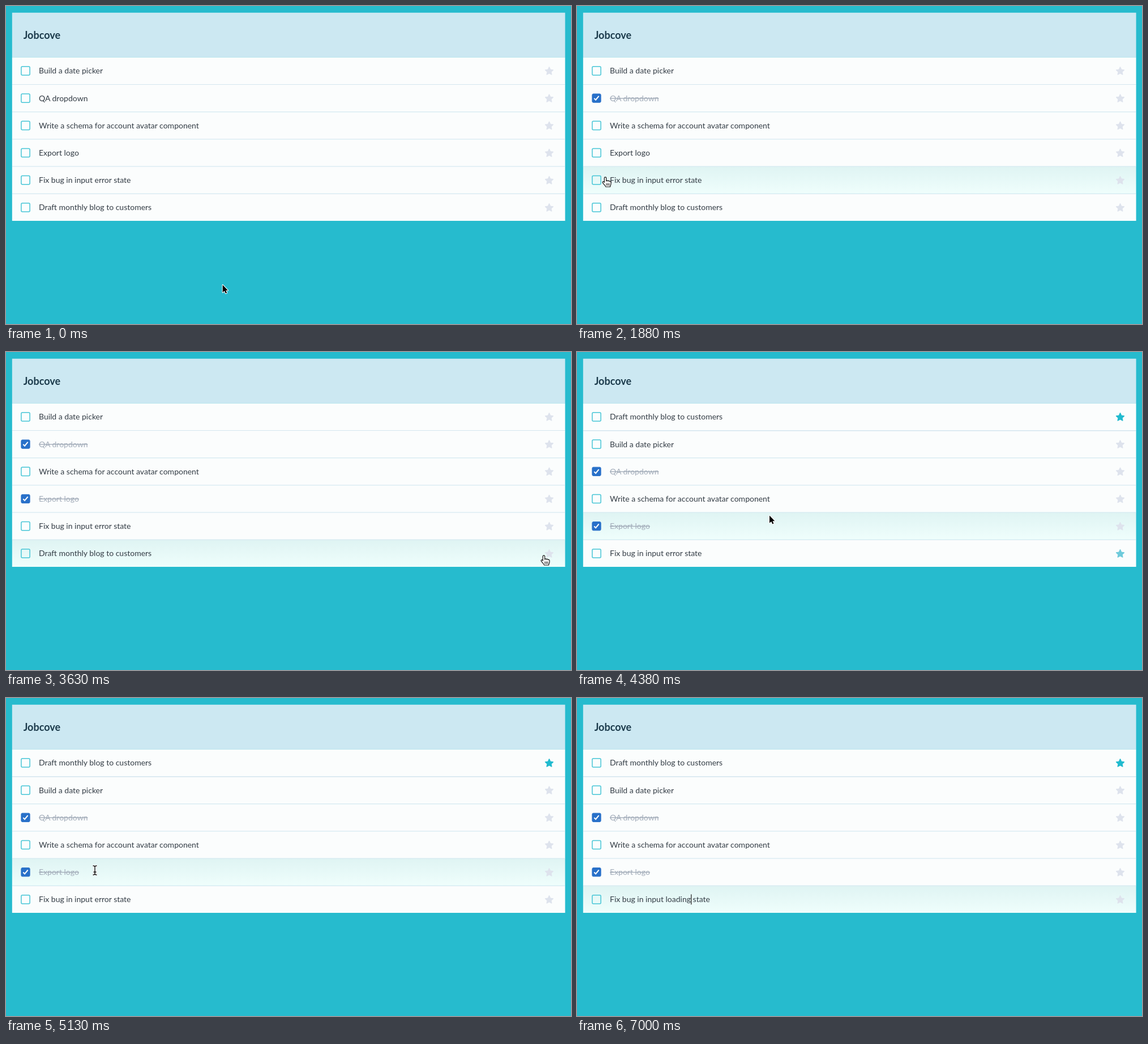
An HTML page for the animation above (7.12 s loop, 998 by 561 pixels).

```html
<!DOCTYPE html>
<html lang="en">
<head>
<meta charset="utf-8">
<title>Task list</title>
<style>
  html, body { margin: 0; width: 100%; height: 100%; overflow: hidden; background: #26bbce; }
  #stage { display: block; width: 100%; height: 100%; }
  text { font: 14px Lato, "Open Sans", sans-serif; fill: #333c45; white-space: pre; }
  .title { font-size: 18px; font-weight: 700; fill: #1b3a4b; }

  .back { fill: #fbfdfd; }
  .hover .back { fill: url(#glow); }
  .line { fill: #d4e6ef; }
  .pressed text, .done text { text-decoration: line-through; }
  .done text { fill: #a3adba; }

  .box { fill: none; stroke: #45c5d6; stroke-width: 1.5; }
  .check { fill: none; stroke: #fff; stroke-width: 2; visibility: hidden; }
  .pressed .box { fill: #2159a9; stroke: #2159a9; stroke-width: 1; }
  .done .box { fill: #2870c9; stroke: #2870c9; stroke-width: 1; }
  .done .check { visibility: visible; }

  .star { fill: #dee3ed; stroke: #dee3ed; stroke-width: 1.5; stroke-linejoin: round; }
  .star.on { fill: #21bbcf; stroke: #21bbcf; }

  #cursor g { display: none; stroke-linejoin: round; stroke-linecap: round; }
  #cursor[data-kind=arrow] .arrow,
  #cursor[data-kind=hand] .hand,
  #cursor[data-kind=beam] .beam { display: block; }
</style>
</head>
<body>
<svg id="stage">
  <defs>
    <linearGradient id="glow" x2="0" y2="1">
      <stop stop-color="#dff4f3"/>
      <stop offset="1" stop-color="#effefc"/>
    </linearGradient>
    <path id="bar" d="M-3-8Q0-8 0-6Q0-8 3-8M0-6V6M-3 8Q0 8 0 6Q0 8 3 8M-2 3H2"/>
  </defs>
  <rect x="10.8" y="11.8" width="976.8" height="79" fill="#cce8f2"/>
  <text class="title" x="30.7" y="57.5">Jobcove</text>
  <g id="list"></g>
  <g id="cursor">
    <g class="arrow">
      <path d="M0 0V13.2L3.1 10.4L5.3 15L7.5 14L5.4 9.7H9.3Z" stroke="#fff" stroke-width="2" paint-order="stroke"/>
    </g>
    <g class="hand" fill="#fff" stroke="#111" stroke-width="1.2">
      <path d="M-1.7 1.6A1.7 1.7 0 0 1 1.7 1.6V7C1.9 5.4 4.4 5.4 4.6 7C5.2 5.8 7.2 6 7.4 7.6C8.2 6.8 10 7.2 10 8.8V11.5C10 13.6 8.6 14.6 8.6 17H.6C.2 14.8-2 13.4-4.6 9.8C-5.6 8.2-3.6 7-2.4 8.3L-1.7 9.2Z"/>
      <path d="M2 11V14.5M4.4 11V14.5M6.8 11V14.5" stroke-width="1"/>
    </g>
    <g class="beam" fill="none">
      <use href="#bar" stroke="#fff" stroke-width="3"/>
      <use href="#bar" stroke="#111" stroke-width="1.4"/>
    </g>
  </g>
</svg>
<script>
  const LOOP = 7120, STEP = 125, FADE = 300;
  const TOP = 90.8, PITCH = 48.2, HEIGHT = PITCH - 1, MID = HEIGHT / 2;
  const ARRIVE = 3625, REORDER = 4000, LEAVE = 4250, SELECT = 5750, TYPE = 6125;
  const NEW_WORD = 'loading';

  // press: when the checkbox goes down; it is released one step later
  const tasks = [
    { text: 'Build a date picker' },
    { text: 'QA dropdown', press: 1125 },
    { text: 'Write a schema for account avatar component' },
    { text: 'Export logo', press: 2625 },
    { text: 'Fix bug in input <tspan id="word">error</tspan> state' },
    { text: 'Draft monthly blog to customers', pinned: true }
  ];

  const checkbox = slot => ({ x: 36, y: TOP + PITCH * slot + MID + 3 });
  const home = { x: 382.7, y: 492 };
  const moves = [
    { from: 0, to: 1000, at: checkbox(1) },
    { from: 1375, to: 1875, at: { x: 50, y: 302 } },
    { from: 1875, to: 2250, at: checkbox(3) },
    { from: 2875, to: ARRIVE, at: { x: 950, y: 359 } },
    { from: 4125, to: 4375, at: { x: 340, y: 288.5 } },
    { from: 4375, to: 5125, at: { x: 157, y: 304 } },
    { from: 5125, to: 5625, at: { x: 172, y: 355 } }
  ];

  const clamp = v => Math.min(1, Math.max(0, v));
  const ramp = (t, from, to) => clamp((t - from) / (to - from));
  const ease = f => f * f * (3 - 2 * f);

  const starPath = 'M' + Array.from({ length: 10 }, (_, i) => {
    const r = i % 2 ? 3.5 : 7.2, a = i * Math.PI / 5;
    return [959.5 + r * Math.sin(a), MID + .7 - r * Math.cos(a)];
  }).join('L') + 'Z';

  const rowMarkup = (task, i) => `
    <g>
      <rect class="line" x="10.8" y="${HEIGHT - .5}" width="976.8" height="${i < 5 ? 2 : 0}"/>
      <rect class="back" x="10.8" width="976.8" height="${HEIGHT}"/>
      <rect class="box" x="26.9" y="${MID - 7.6}" width="15.2" height="15.2" rx="2"/>
      <path class="check" d="M30.3 ${MID + .3}l2.7 2.8l5.6-6.8"/>
      <rect class="mark" y="${MID - 9}" height="18"/>
      <text x="58" y="${MID + 5}">${task.text}</text>
      <path class="star" d="${starPath}"/>
      <path class="star on" d="${starPath}"/>
    </g>`;

  const list = document.getElementById('list');
  list.innerHTML = tasks.map(rowMarkup).join('');
  const rows = [...list.children];
  const lit = rows.map(row => row.querySelector('.on'));
  const word = document.getElementById('word');
  const mark = word.closest('g').querySelector('.mark');
  const cursor = document.getElementById('cursor');

  function cursorAt(t) {
    let { x, y } = home;
    for (const { from, to, at } of moves) {
      const f = ease(ramp(t, from, to));
      x += (at.x - x) * f;
      y += (at.y - y) * f;
    }
    return { x, y };
  }

  function cursorKind(x, y, slot) {
    if (slot < 0 || slot >= tasks.length) return 'arrow';
    if (x < 58 || x > 940) return 'hand';
    return Math.abs(y - TOP - PITCH * slot - MID) < 14 ? 'beam' : 'arrow';
  }

  function checkState(task, t) {
    if (!task.press || t < task.press) return '';
    return t < task.press + STEP ? 'pressed' : 'done';
  }

  // The mark is the selection behind the word, then the caret after it.
  function editWord(t) {
    const typing = t >= TYPE;
    word.textContent = typing ? NEW_WORD.slice(0, (t - TYPE) / STEP + 1) : 'error';
    const left = word.getStartPositionOfChar(0).x, width = word.getComputedTextLength();
    mark.setAttribute('x', typing ? left + width : left);
    mark.setAttribute('width', typing ? 1.5 : t >= SELECT ? width : 0);
    mark.setAttribute('fill', typing ? '#444' : '#b4d7fe');
  }

  function render(now) {
    const t = Math.floor(now % LOOP / STEP) * STEP;
    const { x, y } = cursorAt(t);
    const hovered = Math.floor((y - TOP) / PITCH);
    const starGlow = ramp(t, ARRIVE, ARRIVE + FADE) - ramp(t, LEAVE, LEAVE + FADE);

    tasks.forEach((task, i) => {
      const slot = t < REORDER ? i : (i + 1) % tasks.length;
      const pinned = task.pinned && t >= REORDER;
      rows[i].setAttribute('class', checkState(task, t) + (slot === hovered ? ' hover' : ''));
      rows[i].setAttribute('transform', `translate(0 ${TOP + PITCH * slot})`);
      rows[i].querySelector('.line').setAttribute('height', slot < 5 ? 2 : 0);
      lit[i].style.opacity = pinned ? 1 : slot === 5 ? starGlow : 0;
    });

    editWord(t);
    cursor.dataset.kind = t >= TYPE ? 'none' : cursorKind(x, y, hovered);
    cursor.setAttribute('transform', `translate(${x} ${y})`);
  }

  const start = performance.now();
  (function tick() {
    render(performance.now() - start);
    requestAnimationFrame(tick);
  })();
</script>
</body>
</html>
```
